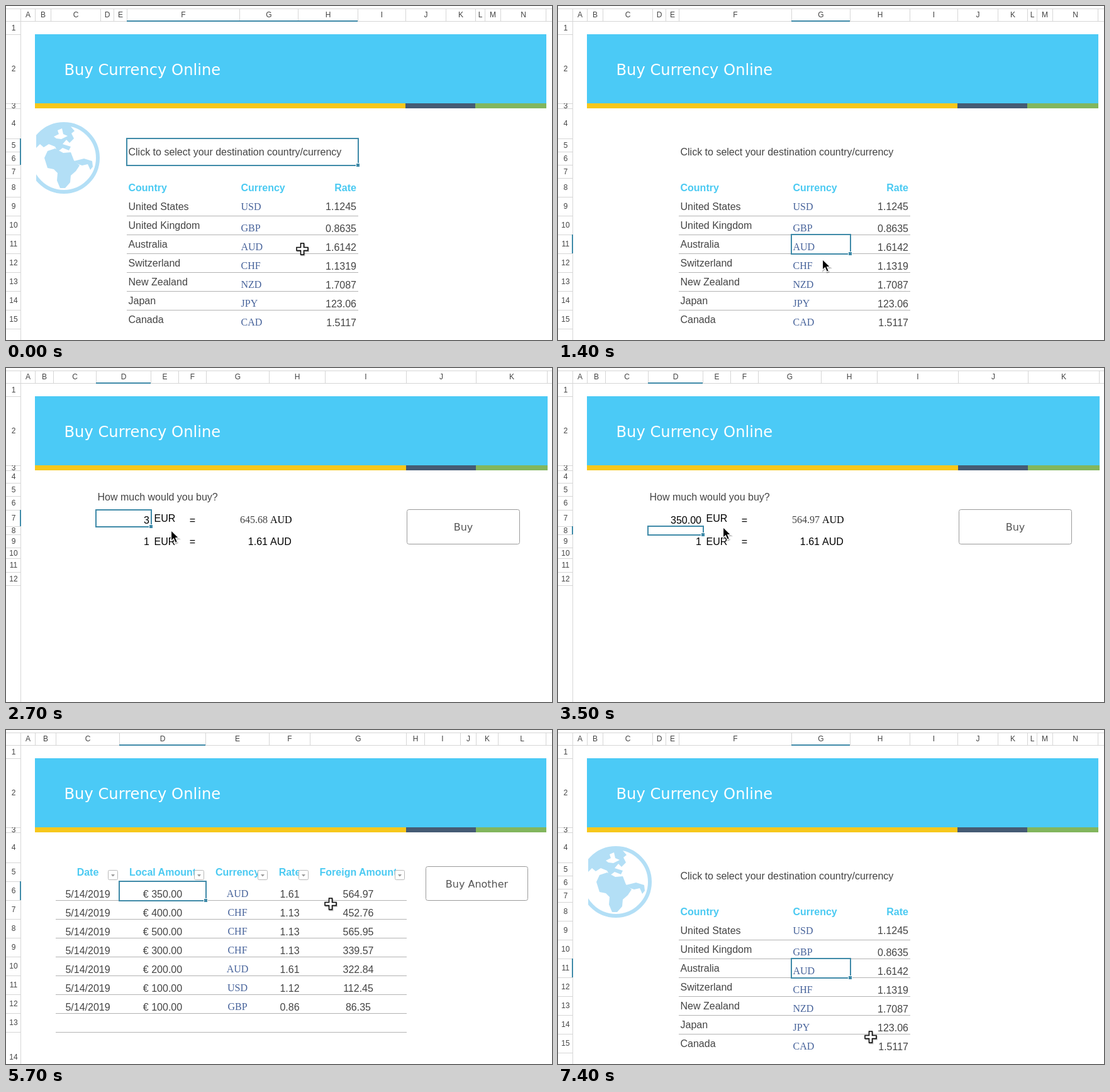
Animation of 868 by 532 pixels, one loop 7.5 s. Source, as an HTML page:

```html
<!DOCTYPE html>
<html lang="en">
<head>
<meta charset="utf-8">
<title>Buy Currency Online</title>
<style>
html, body { margin: 0; width: 100%; height: 100%; overflow: hidden; background: #fff; }
#stage { display: block; width: 868px; height: 532px; }
text { font: 16px "Liberation Sans", Arial, sans-serif; fill: #444; white-space: pre; }
.head { font-size: 12px; text-anchor: middle; }
.bold { font-weight: bold; fill: #4bcaf2; }
.link { font-family: "Liberation Serif", Times, serif; fill: #46629a; }
.serif { font-family: "Liberation Serif", Times, serif; }
.black { fill: #000; }
.mid { text-anchor: middle; }
.end { text-anchor: end; }
.title { font: 24.2px "DejaVu Sans", Verdana, sans-serif; fill: #fff; }
.label { font: 16px "DejaVu Sans", Verdana, sans-serif; fill: #555; text-anchor: middle; }
.grid { stroke: #d6d6d6; fill: none; }
.rule { stroke: #b3b3b3; }
.box { fill: #fff; stroke: #9a9a9a; }
.sel { fill: none; stroke: #3f8aa8; stroke-width: 2; }
.mark { fill: #3f8aa8; }
.land { fill: #b3dff6; }
#cursor { animation: move 7.5s infinite; }
@keyframes move {
  0% { transform: translate(471px, 387px); animation-timing-function: steps(8); }
  10.66% { transform: translate(400px, 385px); animation-timing-function: steps(2); }
  13.33% { transform: translate(400px, 385px); animation-timing-function: steps(4); }
  18.66% { transform: translate(420px, 403px); animation-timing-function: steps(4); }
  23.99% { transform: translate(310px, 327px); animation-timing-function: steps(6); }
  31.99% { transform: translate(262px, 260px); animation-timing-function: steps(11); }
  46.66% { transform: translate(262px, 253px); animation-timing-function: steps(5); }
  53.33% { transform: translate(470px, 292px); animation-timing-function: steps(3); }
  57.33% { transform: translate(580px, 309px); animation-timing-function: steps(1); }
  58.66% { transform: translate(580px, 309px); animation-timing-function: steps(5); }
  65.33% { transform: translate(589px, 316px); animation-timing-function: steps(2); }
  67.99% { transform: translate(715px, 262px); animation-timing-function: steps(6); }
  75.99% { transform: translate(516px, 277px); animation-timing-function: steps(8); }
  86.66% { transform: translate(748px, 250px); animation-timing-function: steps(4); }
  91.99% { transform: translate(748px, 250px); animation-timing-function: steps(5); }
  98.66%, 100% { transform: translate(497px, 489px); }
}
</style>
</head>
<body>
<svg id="stage" viewBox="0 0 868 532"></svg>
<script>
const LOOP = 7500;
const rules = [];

// Shows content only within the given [from, to] spans in ms.
function during(spans, content) {
  const name = 'show' + rules.length;
  const pct = ms => Math.floor(ms / LOOP * 10000) / 100 + '%';
  const steps = spans.map(([a, b]) => `${pct(a)}{opacity:1}${pct(b)}{opacity:0}`).join('');
  rules.push(`@keyframes ${name}{0%{opacity:0}${steps}}`);
  return `<g style="animation:${name} ${LOOP}ms step-end infinite">${content}</g>`;
}

const text = (x, y, s, cls = '') => `<text x="${x}" y="${y}" class="${cls}">${s}</text>`;
const rect = (x, y, w, h, attrs) => `<rect x="${x}" y="${y}" width="${w}" height="${h}" ${attrs}/>`;
const range = n => [...Array(n).keys()];

function sheet(cols, rows, split) {
  const right = cols[cols.length - 1] + 1;
  let out = rect(0, 0, 868, 532, 'fill="#fff"');
  out += '<path class="grid" d="M0 4.5H868M0 24.5H868M23.5 4V532';
  out += cols.slice(1).map(x => `M${x + .5} 5V24`).join('');
  out += rows.slice(1).map(y => `M0 ${y + .5}H23`).join('') + '"/>';
  cols.slice(1).forEach((x, i) => {
    out += text((cols[i] + x) / 2 + .5, 18, String.fromCharCode(65 + i), 'head');
  });
  rows.slice(1).forEach((y, i) => {
    const h = y - rows[i];
    out += `<svg x="0" y="${rows[i]}" width="23" height="${h}">${text(12, h / 2 + 4, i + 1, 'head')}</svg>`;
  });
  out += rect(46, 45, right - 46, 110, 'fill="#4bcaf6"');
  out += rect(46, 155, split - 46, 8, 'fill="#f7c71c"');
  out += rect(split, 155, 111, 8, 'fill="#455b74"');
  out += rect(split + 111, 155, right - split - 111, 8, 'fill="#82b65d"');
  return out + text(92.5, 110, 'Buy Currency Online', 'title');
}

function select(x1, y1, x2, y2) {
  return rect(x1, 23, x2 - x1, 2, 'class="mark"') + rect(22, y1, 2, y2 - y1, 'class="mark"')
    + rect(x1, y1, x2 - x1 + 1, y2 - y1 + 1, 'class="sel"')
    + rect(x2 - 3, y2 - 3, 7, 7, 'fill="#fff"') + rect(x2 - 2, y2 - 2, 5, 5, 'class="mark"');
}

const button = (x, y, w, h, s) =>
  rect(x + .5, y + .5, w, h, 'rx="3" class="box"') + text(x + w / 2 + .5, y + h / 2 + 6.5, s, 'label');

const lines = (x1, x2, y, n) =>
  `<path class="rule" d="${range(n).map(i => `M${x1} ${y + i * 30 + .5}H${x2}`).join('')}"/>`;

const globe = `<clipPath id="edge"><rect x="48" y="180" width="110" height="125"/></clipPath>
  <g clip-path="url(#edge)">
  <circle cx="92" cy="242" r="54" fill="#fff" stroke="#b3dff6" stroke-width="6"/>
  <path class="land" d="M44 226L48 207 62 194 84 188 102 191 109 199 104 203 108 211 101 218 96 213 90 220 103 224
    100 230 90 226 82 232 78 224 68 220 60 225 54 220 48 226Z"/>
  <path fill="#fff" d="M76 208L84 204 82 198 89 195 91 204 98 207 88 212 80 211Z"/>
  <path class="land" d="M61 242L66 231 78 227 91 234 103 233 108 246 117 254 111 263 103 270 102 281 94 290 86 290
    81 278 82 266 76 260 66 258Z"/>
  <path class="land" d="M108 247L124 243 137 247 138 256 134 261 130 252 121 254 115 252Z"/></g>`;

function countryPage() {
  const rates = ['United States,USD,1.1245', 'United Kingdom,GBP,0.8635', 'Australia,AUD,1.6142',
    'Switzerland,CHF,1.1319', 'New Zealand,NZD,1.7087', 'Japan,JPY,123.06', 'Canada,CAD,1.5117'];
  let out = sheet([23, 46, 71, 150, 171, 192, 371, 464, 559, 635, 699, 746, 761, 786, 858],
    [24, 45, 155, 163, 211, 232, 253, ...range(9).map(i => 274 + i * 30)], 635);
  out += during([[0, 1300], [7200, LOOP]], globe);
  out += text(194.5, 238, 'Click to select your destination country/currency');
  out += text(194.5, 295, 'Country', 'bold') + text(373.5, 295, 'Currency', 'bold') + text(557, 295, 'Rate', 'bold end');
  out += lines(192, 560, 334, 6);
  rates.forEach((row, i) => {
    const [country, code, rate] = row.split(',');
    const y = 325 + i * 30;
    out += text(194.5, y, country) + text(373.5, y + (i ? 4 : 0), code, 'link')
      + text(557, y + (i ? 5 : 0), rate, 'end');
  });
  return out + during([[0, 1000]], select(192, 211, 559, 253))
    + during([[1000, LOOP]], select(371, 364, 464, 394));
}

function amountPage() {
  const typed = [['400.00', 1700, 2600], ['3', 2600, 2800], ['35', 2800, 3000], ['350', 3000, 3200], ['350.00', 3200, 5100]];
  const before = [[1700, 3200]], after = [[3200, 5100]];
  let out = sheet([23, 46, 75, 143, 230, 274, 318, 418, 507, 636, 747, 860],
    [24, 45, 155, 163, 183, 204, 226, 252, 265, 286, 303, 325, 346], 636);
  out += text(145.5, 211, 'How much would you buy?');
  out += typed.map(([s, a, b]) => during([[a, b]], text(228, 248, s, 'end black'))).join('');
  out += text(235.5, 245, 'EUR', 'black') + text(296.5, 248, '=', 'mid black');
  out += during(before, text(416, 247, '645.68', 'serif end')) + during(after, text(416, 247, '564.97', 'serif end'));
  out += text(420, 247, 'AUD', 'serif black');
  out += text(228, 282, '1', 'end black') + text(235.5, 282, 'EUR', 'black') + text(296.5, 282, '=', 'mid black');
  out += text(416, 282, '1.61', 'end black') + text(420, 282, 'AUD', 'black');
  out += during(before, select(143, 226, 230, 252)) + during(after, select(143, 252, 230, 265));
  return out + during([[2000, 5100]], button(637, 225, 179, 55, 'Buy'));
}

function historyPage() {
  const mids = [130, 249, 368, 451, 560];
  const heads = ['Date', 'Local Amount', 'Currency', 'Rate', 'Foreign Amount'];
  const orders = ['350,AUD,1.61,564.97', '400,CHF,1.13,452.76', '500,CHF,1.13,565.95', '300,CHF,1.13,339.57',
    '200,AUD,1.61,322.84', '100,USD,1.12,112.45', '100,GBP,0.86,86.35'];
  const ends = [180, 317, 418, 483, 636];
  let out = sheet([23, 46, 79, ...ends, 665, 722, 747, 782, 858],
    [24, 45, 155, 163, ...range(10).map(i => 211 + i * 30), 560], 636);
  heads.forEach((s, i) => {
    const x = ends[i] - 17.5;
    out += text(mids[i], 232, s, 'bold mid') + rect(x, 223.5, 15, 15, 'rx="2" fill="#fff" stroke="#b8b8b8"')
      + `<path fill="#999" d="M${x + 4.5} 230h6l-3 3.5z"/>`;
  });
  out += lines(79, 637, 271, 8);
  orders.forEach((row, i) => {
    const [sum, code, rate, total] = row.split(',');
    ['5/14/2019', `€ ${sum}.00`, code, rate, total].forEach((s, k) => {
      out += text(mids[k], (k === 2 ? 266 : 267) + i * 30, s, k === 2 ? 'link mid' : 'mid');
    });
  });
  return out + select(180, 241, 317, 271) + button(667, 217, 162, 54, 'Buy Another');
}

const plus = 'M-2.5-9h5v6.5h6.5v5h-6.5v6.5h-5v-6.5h-6.5v-5h6.5z';
const cross = `<path d="${plus}" transform="translate(1 1.5)" fill="#0003" stroke="#0003" stroke-width="2"/>
  <path d="${plus}" fill="#fff" stroke="#000" stroke-width="1.5"/>`;
const tip = 'M.5.5V17.5L4.5 13.8 7.3 20.3 10.4 19 7.7 12.7H13Z';
const arrow = `<path d="${tip}" transform="translate(.5 1.5)" fill="#0003" stroke="#0003" stroke-width="2"/>
  <path d="${tip}" stroke="#fff" stroke-width="1.2"/>`;

document.getElementById('stage').innerHTML =
  during([[0, 1700], [6900, LOOP]], countryPage())
  + during([[1700, 5100]], amountPage())
  + during([[5100, 6900]], historyPage())
  + '<g id="cursor">'
  + during([[0, 1000], [4000, 5000], [5300, 6400], [7000, LOOP]], cross)
  + during([[1000, 4000], [5000, 5300], [6400, 7000]], arrow)
  + '</g>';
const style = document.createElement('style');
style.textContent = rules.join('\n');
document.head.append(style);
</script>
</body>
</html>
```
